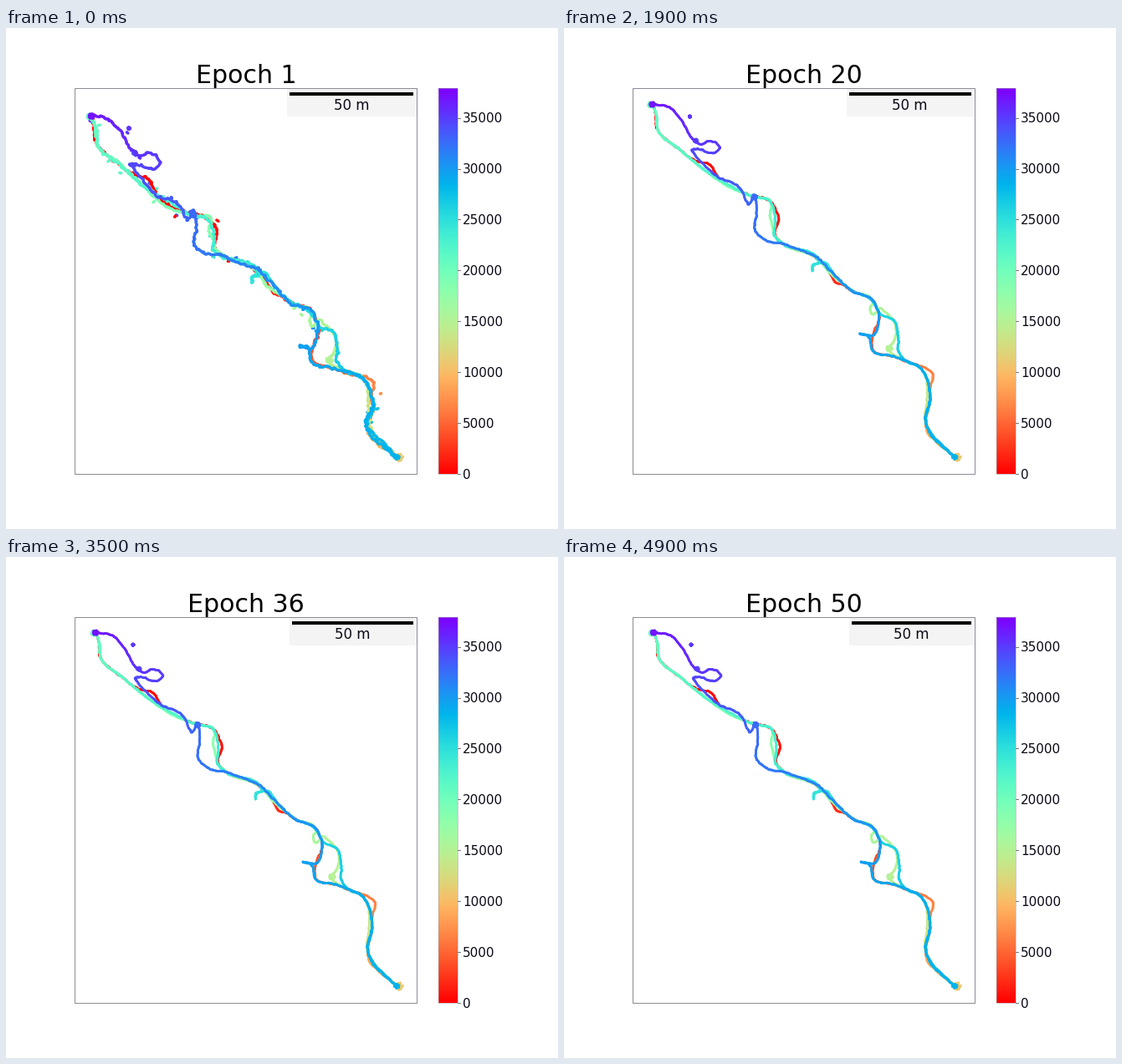
Write a matplotlib script that moves like this. It is 660 by 600 pixels and loops after 7000 ms.

```python
import numpy as np
import matplotlib.pyplot as plt
from matplotlib.animation import FuncAnimation
from matplotlib.patches import Rectangle

W, H, DPI = 660, 600, 100
EPOCHS, FRAMES, STEP = 50, 70, 100
T_MAX = 37930
PX = 72 / DPI
INK = "#0a0a18"
CMAP = plt.get_cmap("rainbow_r")
rng = np.random.default_rng(4)

plt.rcParams["font.family"] = "DejaVu Sans"


def ring(x, y, rx, ry, start, turn):
    """Key points round an ellipse, angles in degrees."""
    a = np.radians(start + np.linspace(0, turn, 7))
    return list(zip(x + rx * np.cos(a), y + ry * np.sin(a)))


# Stretches of trail, from the north-west end to the south-east end
NORTH = [(108, 91), (112, 104), (112, 116), (140, 144), (200, 188)]
SHOULDER = [(225, 199), (249, 206), (254, 230), (253, 246)]
HOLLOW = [(212, 191), (223, 210), (229, 201), (231, 224), (229, 238),
          (245, 254)]
RIDGE_A = [(264, 258), (303, 274)]
SPIKE = [(306, 280), (299, 282), (298, 290), (301, 283), (312, 281)]
RIDGE_B = [(325, 296), (345, 313), (370, 325)]
WEST = [(378, 345), (370, 368), (371, 386), (396, 392)]
TIP = [(372, 366), (355, 365), (365, 369)]
EAST = [(379, 340), (397, 351), (401, 368), (403, 390)]
GLADE = ring(371, 336, 4, 6, 270, -270) + [(396, 351), (397, 370), (390, 384)]
TAIL = [(410, 398), (425, 405), (435, 422), (437, 445), (433, 470),
        (437, 483), (467, 514)]
HOME = [(108, 91), (128, 94), (143, 112), (156, 133)]
LOOP = ring(176, 141, 11, 6, 200, 320)

# key points, first and last time, time exponent, pushes (x, y, dx, dy, radius)
WALKS = [
    (NORTH + SHOULDER + RIDGE_A + RIDGE_B + WEST + TAIL, 0, 10500, 2.4,
     [(175, 166, 5, -9, 13), (255, 228, 5, 0, 10), (325, 300, -1, 7, 8),
      (433, 415, 9, -2, 12), (435, 481, -2, 3, 10)]),
    ((NORTH + SHOULDER + RIDGE_A + RIDGE_B + GLADE + TAIL)[::-1],
     11000, 20500, 0.7, [(252, 225, -6, 0, 16), (437, 450, -3, 3, 25)]),
    (NORTH + SHOULDER + RIDGE_A + SPIKE + RIDGE_B + EAST + TAIL,
     20800, 28500, 1.0, []),
    ((HOME + LOOP + [(157, 143), (180, 172)] + HOLLOW + RIDGE_A + RIDGE_B
      + WEST[:1] + TIP + WEST[2:] + TAIL)[::-1], 28500, 36800, 1.6, []),
]
# Resting places: x, y, spread, time
STOPS = [(105, 91, 4, 20600), (390, 383, 4.5, 15000), (470, 514, 6, 11000),
         (467, 514, 4, 28300), (229, 201, 4, 32600), (159, 134, 3, 34300),
         (107, 90.5, 4, 36900), (152, 105, 1.5, 35300)]


def curve(points, gap=0.7):
    """Smooth curve through the points, sampled at even steps."""
    p = np.array(points, float)
    h = np.hypot(*np.diff(p, axis=0).T)
    knots = np.r_[0, np.cumsum(h)]
    m = np.gradient(p, knots, axis=0)
    t = np.arange(0, knots[-1], gap)
    i = np.searchsorted(knots, t, "right") - 1
    h = h[i, None]
    s = (t - knots[i])[:, None] / h
    xy = (p[i] * (1 - s) ** 2 * (1 + 2 * s) + p[i + 1] * s ** 2 * (3 - 2 * s)
          + h * s * (1 - s) * (m[i] * (1 - s) - m[i + 1] * s))
    return t / knots[-1], xy


def smooth_noise(n, width):
    kernel = np.hanning(width + 2)
    kernel /= np.sqrt((kernel ** 2).sum())
    raw = rng.normal(size=(2, n + len(kernel) - 1))
    return np.column_stack([np.convolve(r, kernel, "valid") for r in raw])


def disc(x, y, radius, n=50):
    r, a = radius * np.sqrt(rng.random(n)), 2 * np.pi * rng.random(n)
    return np.column_stack([x + r * np.cos(a), y + r * np.sin(a)])


def build_cloud():
    parts = []
    for points, t0, t1, power, pushes in WALKS:
        u, xy = curve(points)
        for x, y, dx, dy, radius in pushes:
            d2 = ((xy - (x, y)) ** 2).sum(axis=1)
            xy = xy + np.exp(-d2 / radius ** 2)[:, None] * (dx, dy)
        noise = smooth_noise(len(u), 7), smooth_noise(len(u), 70)
        parts.append((xy, *noise, t0 + (t1 - t0) * u ** power))
    for x, y, radius, t in STOPS:
        xy = disc(x, y, radius * 0.75)
        still = np.zeros_like(xy)
        parts.append((xy, still, still, np.full(len(xy), t)))
    xy, fine, slow, time = map(np.concatenate, zip(*parts))
    order = np.argsort(time, kind="stable")
    return xy[order], fine[order], slow[order], time[order]


XY, FINE, SLOW, TIME = build_cloud()

# Short stray dashes beside the trail that vanish as training goes on
STRAYS = 45
PICK = np.repeat(rng.integers(len(XY), size=STRAYS), 3)
DASH = (rng.uniform((0.4, -0.8), (1.2, 0.8), (STRAYS, 1, 2))
        * np.arange(3)[None, :, None]
        + rng.normal(0, 5, (STRAYS, 1, 2))).reshape(-1, 2)
LIFE = np.repeat(2 + rng.exponential(3, STRAYS), 3)


def decay(epoch):
    return np.exp(-(epoch - 1) / 7)


def drift(xy, epoch):
    """Error of the map, fading towards the last epoch."""
    y = xy[:, 1]
    dx = -5 * np.exp(-(epoch / 18) ** 2) / (1 + np.exp((y - 390) / 10))
    dy = decay(epoch) * (15 * np.clip((514 - y) / 130, 0, 1)
                         + 8 * np.exp(-((y - 195) / 40) ** 2))
    return np.column_stack([dx, dy])


def cloud(epoch):
    early = decay(epoch)
    walk = (XY + drift(XY, epoch) + FINE * (0.25 + 0.4 * early)
            + SLOW * (0.4 + 1.1 * early))
    alive = (LIFE > epoch)[:, None]
    return np.vstack([np.where(alive, walk[PICK] + DASH, -50), walk])


def dot_size(epoch):
    return ((2.9 + 0.5 * decay(epoch)) * PX) ** 2


fig = plt.figure(figsize=(W / DPI, H / DPI), dpi=DPI, facecolor="white")
ax = fig.add_axes([0, 0, 1, 1])
ax.axis("off")

# Colour bar
ax.imshow(np.linspace(1, 0, 256)[:, None], cmap=CMAP, aspect="auto",
          extent=(517, 540, 534, 72), interpolation="nearest")
ax.add_patch(Rectangle((517, 72), 23, 462, fill=False, ec="#999999",
                       lw=0.5 * PX))
for value in range(0, 35001, 5000):
    y = 534 - 462 * value / T_MAX
    ax.plot([540, 543], [y, y], color="#777777", lw=PX)
    ax.text(546, y + 5.7, str(value), size=11, color=INK)

# Map
colors = CMAP(np.r_[TIME[PICK], TIME] / T_MAX)
dots = ax.scatter(*cloud(1).T, s=dot_size(1), c=colors, linewidths=0, zorder=3)
panel = ax.add_patch(Rectangle((337, 72), 154, 33.5, fc="#f4f4f4", zorder=4))
bar = ax.add_patch(Rectangle((339.5, 77), 147, 4, fc="black", zorder=5))
scale = ax.text(413, 98.3, "50 m", size=12, ha="center", color=INK, zorder=5)
ax.add_patch(Rectangle((82, 72), 409, 462, fill=False, ec="#8c8c96", lw=PX,
                       zorder=6))
title = ax.text(287, 66, "Epoch 1", size=21.6, ha="center", color="black")
ax.set(xlim=(0, W), ylim=(H, 0))


def draw(frame):
    epoch = min(frame + 1, EPOCHS)
    left = 339 + 4.5 * epoch / EPOCHS
    title.set_text(f"Epoch {epoch}")
    dots.set_offsets(cloud(epoch))
    dots.set_sizes([dot_size(epoch)])
    bar.set_x(left)
    bar.set_width(486.5 - left)
    panel.set_x(left - 3)
    panel.set_width(494 - left)
    scale.set_x((left + 486.5) / 2)
    return title, dots, bar, panel, scale


anim = FuncAnimation(fig, draw, frames=FRAMES, interval=STEP, repeat=True,
                     repeat_delay=0, blit=False)
plt.show()
```
